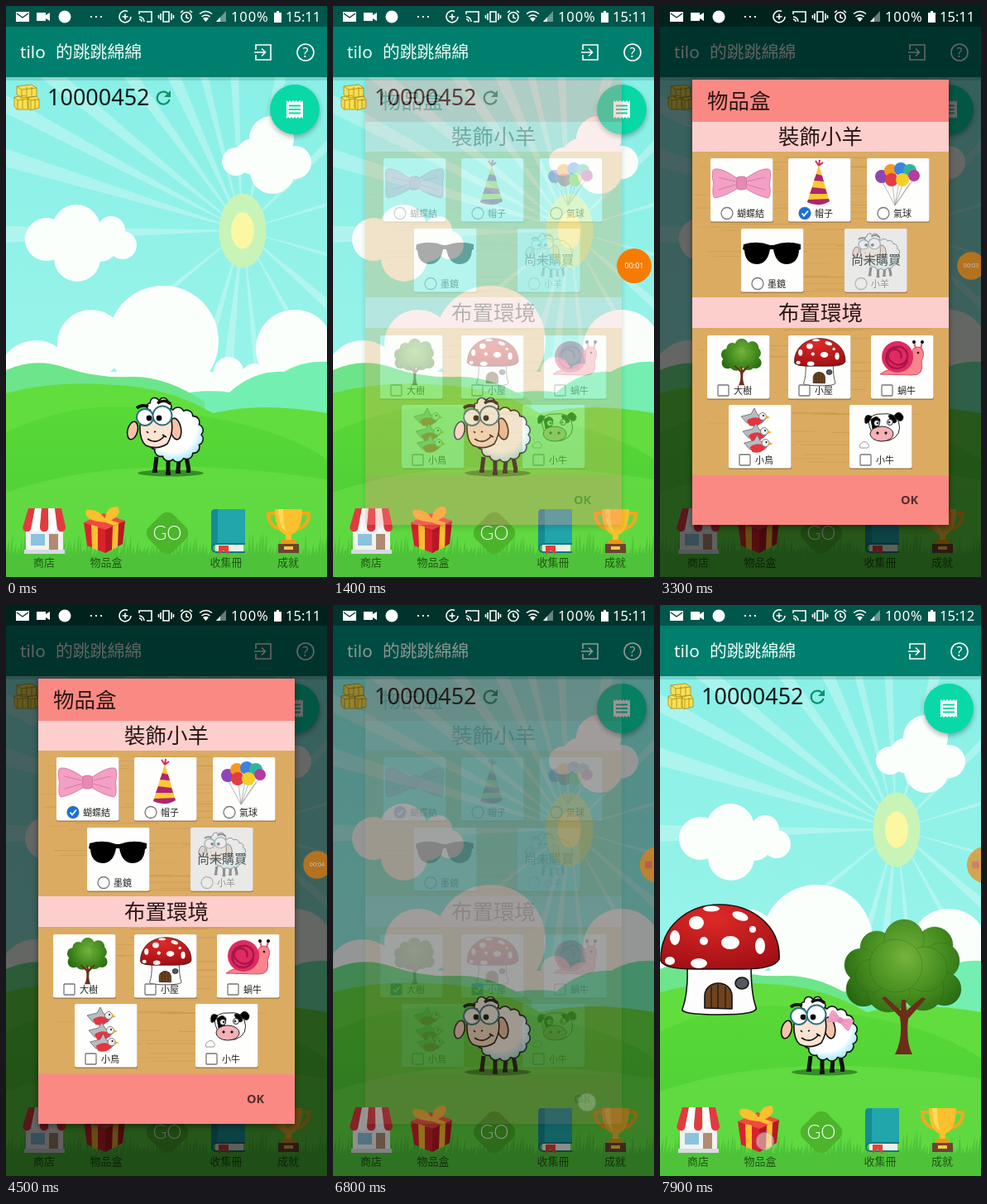
Animation, 388 px wide and 690 px high, one loop 8000 ms. Source, as an HTML page:

```html
<!DOCTYPE html>
<html lang="zh-Hant">
<head>
<meta charset="utf-8">
<title>跳跳綿綿</title>
<style>
html, body { margin: 0; height: 100%; overflow: hidden; background: #000 }
svg { display: block; width: 100vw; height: 100vh }
text { font-family: 'Noto Sans', 'Noto Sans CJK TC', 'Noto Sans CJK JP', sans-serif }
.mid { text-anchor: middle }
.ln { fill: none; stroke: #fff; stroke-width: 1.6 }
.ink { stroke: #111; stroke-width: 1.6; stroke-linejoin: round }
</style>
</head>
<body>
<svg viewBox="0 0 388 690" preserveAspectRatio="none">
<defs>
  <linearGradient id="sky" x2="0" y2="1"><stop stop-color="#86efe7"/><stop offset="1" stop-color="#a2f6ea"/></linearGradient>
  <linearGradient id="hill" x2="0" y2="1"><stop stop-color="#58d936"/><stop offset="1" stop-color="#4ccb38"/></linearGradient>
  <radialGradient id="leaf" gradientUnits="userSpaceOnUse" cx="297" cy="425" r="85"><stop stop-color="#75b33c"/><stop offset=".5" stop-color="#4a9122"/><stop offset="1" stop-color="#246610"/></radialGradient>
  <radialGradient id="red" cx=".45" cy=".2" r=".9"><stop stop-color="#dd2a28"/><stop offset="1" stop-color="#9d0d12"/></radialGradient>
  <radialGradient id="fleece" cx=".45" cy=".4" r=".6"><stop offset=".7" stop-color="#fff"/><stop offset="1" stop-color="#9deaf2"/></radialGradient>

  <g id="bow" stroke="#c9719c" stroke-width=".8">
    <path fill="#f3a0c4" d="M-4-5Q-24-19-33-17Q-37-15-34 0Q-36 17-32 18Q-20 16-4 6ZM4-5Q24-19 33-17Q37-15 34 0Q36 17 32 18Q20 16 4 6Z"/>
    <path fill="none" d="M-7-2L-28-7M-7 2L-28 8M7-2L28-7M7 2L28 8"/>
    <rect x="-6" y="-8" width="12" height="16" rx="4" fill="#e889b4"/>
  </g>

  <g id="tree">
    <g id="leaves" fill="url(#leaf)" stroke="#1d5a0c" stroke-opacity=".3"></g>
    <path fill="#6b2e1a" d="M284 543Q294 524 290 498L268 475L272 473L291 490L292 477H297L298 490L317 474L321 476L300 500Q297 528 305 543Z"/>
  </g>

  <g id="house" class="ink">
    <path fill="#fdfdfd" d="M33 436Q34 470 27 488Q24 495 72 495Q120 495 116 486Q110 470 110 434Z"/>
    <path fill="#6f4321" d="M54 487V472C55 452 86 452 87 472V488Z"/>
    <path fill="none" stroke="#3a200d" d="M62 461V487M70 457V487M79 461V487"/>
    <ellipse cx="99" cy="457" rx="8" ry="7" fill="#55585c"/>
    <path fill="url(#red)" d="M1 430C0 388 34 362 72 362C112 362 146 388 144 428Q138 440 100 440L42 440Q5 440 1 430Z"/>
    <g fill="#fff" stroke="none">
      <ellipse cx="44" cy="384" rx="9" ry="8"/><ellipse cx="62" cy="367" rx="10" ry="3.500"/><ellipse cx="18" cy="402" rx="6" ry="9"/>
      <ellipse cx="85" cy="408" rx="11" ry="8"/><ellipse cx="97" cy="376" rx="10" ry="5" transform="rotate(20 97 376)"/><ellipse cx="53" cy="406" rx="5" ry="5"/>
      <ellipse cx="47" cy="433" rx="10" ry="6"/><ellipse cx="112" cy="392" rx="4" ry="4"/><ellipse cx="121" cy="412" rx="6" ry="10"/><ellipse cx="12" cy="430" rx="6" ry="5"/>
    </g>
  </g>

  <g id="sheep" class="ink">
    <path fill="none" stroke-width="5" d="M182 545L180 561M196 548V564M209 548L208 561M218 545L221 561"/>
    <path fill="none" stroke-width="4" d="M177 562H183M193 565H199M205 563H211M218 562H223"/>
    <path id="wool" fill="url(#fleece)"/>
    <ellipse cx="153" cy="513" rx="6" ry="11" transform="rotate(14 153 513)" fill="#f4c3aa"/>
    <ellipse cx="205" cy="511" rx="6.500" ry="13" transform="rotate(-10 205 511)" fill="#f4c3aa"/>
    <path fill="#fce4d3" d="M163 494Q180 474 199 496Q204 514 195 529Q183 537 169 531Q159 523 163 494Z"/>
    <path id="fringe" fill="#fdfdfd"/>
    <circle cx="168" cy="497" r="10" fill="#fff" stroke="#2d7180" stroke-width="2"/>
    <circle cx="189" cy="495" r="11.500" fill="#fff" stroke="#2d7180" stroke-width="2"/>
    <circle cx="173" cy="498" r="2.600"/><circle cx="185" cy="498" r="2.600"/>
    <path fill="none" stroke-width="3.500" d="M158 486Q163 481 172 484M183 480Q192 474 199 481"/>
    <path fill="none" d="M171 523Q182 531 192 519M189 518L194 521M170 514L172 516M179 515L181 514"/>
  </g>

  <path id="check" fill="none" stroke="#fff" stroke-width="1.800" d="M-3.500 0L-1 3L4-3"/>
  <filter id="soft"><feGaussianBlur stdDeviation="3"/></filter>
</defs>

<rect width="388" height="690" fill="url(#sky)"/>
<g id="rays" fill="#fff" opacity=".28"></g>
<ellipse cx="286" cy="271.500" rx="28.500" ry="45" fill="#c9f4b8"/>
<ellipse cx="286" cy="271.500" rx="14" ry="22" fill="#fcf7a2"/>
<g id="clouds" fill="#fbfffc"></g>

<path fill="#74efb2" d="M200 471Q240 462 270 467Q300 440 336 442Q360 428 388 430V520H200Z"/>
<path fill="#6de58a" d="M0 440Q35 424 72 437T150 448T240 478V540H0Z"/>
<path fill="#62dd3e" d="M0 468Q60 452 130 458Q195 460 250 492Q310 478 388 492V690H0Z"/>
<path fill="url(#hill)" d="M0 515Q85 476 165 486Q320 500 388 548V690H0Z"/>
<path fill="#67df45" opacity=".7" d="M0 588Q150 535 388 572V690H0Z"/>
<path id="grass" fill="#45b936" opacity=".65"/>
<g id="decor"><use href="#house"/><use href="#tree"/></g>
<ellipse cx="199" cy="564.500" rx="40" ry="4" fill="#26751e" opacity=".75"/>
<use href="#sheep"/>
<use id="worn" href="#bow" transform="translate(218 502) rotate(25) scale(.42)"/>

<g>
  <path fill="#f2f2f2" d="M24 630H69V661H24Z"/><path fill="#8cc3df" d="M30 638H47V652H30Z"/><path fill="#b08b72" d="M52 638H63V661H52Z"/>
  <path fill="#d5dce0" d="M22 657H71V662H22Z"/>
  <g id="awning"></g>
</g>
<g>
  <path fill="#d8232c" d="M94 624L120 632V661L98 652Z"/><path fill="#b81824" d="M120 632L144 622L141 650L120 661Z"/>
  <path fill="#f04a40" d="M94 624L118 613L144 622L120 633Z"/>
  <path fill="#fac02e" d="M103 627L111 629V658L104 655ZM129 629L136 626L135 654L128 657ZM104 618L110 615L137 625L131 628ZM120 624Q92 622 97 609Q113 607 120 621Q120 605 135 605Q142 617 120 624Z"/>
</g>
<rect x="174" y="616" width="42" height="42" rx="11" transform="rotate(45 195 637)" fill="#4cb52b"/>
<text class="mid" x="195" y="645" font-size="23" font-weight="300" fill="#f3fff0" style="font-family:Lato,sans-serif">GO</text>
<g>
  <path fill="#148c96" d="M248 612Q248 608 253 608H289V650H254Q248 651 248 657Z"/><path fill="#21a6ac" d="M256 608H289V649H256Z"/>
  <path fill="#edf0e8" d="M253 651H287V659H253Z"/><path fill="none" stroke="#117983" stroke-width="2" d="M289 650H254Q249 651 249 655T254 660H289"/>
  <path fill="#e54036" d="M257 652H269V663L263 658L257 663Z"/>
</g>
<g>
  <path fill="none" stroke="#f3a91b" stroke-width="4" d="M326 613H317Q317 629 332 632M357 613H366Q366 629 351 632"/>
  <path fill="#fbc02d" d="M325 608H358Q358 634 345 639V649H338V639Q325 634 325 608Z"/><path fill="#ffda58" d="M329 608H335Q335 628 339 635Q329 630 329 608Z"/>
  <path fill="#e69b18" d="M333 645H350V651H333Z"/><path fill="#6b4332" d="M329 650H354V661H329Z"/><path fill="#f6c64a" d="M336 653H347V657H336Z"/>
</g>
<g class="mid" font-size="13" fill="#1f5313"><text x="46" y="677">商店</text><text x="121" y="677">物品盒</text><text x="266" y="677">收集冊</text><text x="341" y="677">成就</text></g>

<g fill="#f8e052" stroke="#a78a18" stroke-width=".8">
  <path d="M13 97L31 95L37 99V109L19 111L13 107ZM10 110L23 108L27 112V125L13 125L10 121ZM26 111L37 109L40 113V123L29 126L26 122Z"/>
  <path fill="none" d="M13 97L19 101L37 99M19 101V111M10 110L14 114L27 112M14 114V125M26 111L30 114L40 113M30 114V125M25 98V109M31 98V109M20 112V124M35 112V124"/>
</g>
<text x="50" y="120" font-size="27" font-weight="500" fill="#101a18">10000452</text>
<path fill="none" stroke="#11906d" stroke-width="2.200" d="M196.500 107A7.500 7.500 0 1 0 197.500 113"/><path fill="#11906d" d="M199 102V110H191Z"/>
<circle cx="349" cy="128" r="30" opacity=".3" filter="url(#soft)"/>
<circle cx="349" cy="125" r="30" fill="#08d9a7"/>
<path fill="#fff" d="M339 114L341 116L343 114L345 116L347 114L349 116L351 114L353 116L355 114L357 116L359 114V136L357 134L355 136L353 134L351 136L349 134L347 136L345 134L343 136L341 134L339 136Z"/>
<path stroke="#08d9a7" stroke-width="2" d="M342 120.500H356M342 125H356M342 129.500H356"/>

<rect y="86" width="388" height="4" opacity=".13"/>
<rect y="25" width="388" height="61" fill="#007f6e"/>
<text x="17" y="63" font-size="20.800" fill="#eefcf8"><tspan font-weight="500">tilo</tspan><tspan x="60">的跳跳綿綿</tspan></text>
<path class="ln" stroke-width="2" d="M302 53V47H320V65H302V59M300 56H313M309 51.500L313.500 56L309 60.500"/>
<circle class="ln" cx="362" cy="56" r="10"/><text class="mid" x="362" y="62" font-size="16" fill="#fff">?</text>
<rect width="388" height="25" fill="#00564a"/>
<rect id="dim" width="388" height="690"/>

<g fill="#fff">
  <path d="M12 7H28V19H12ZM37 8H48V11L53 8V18L48 15V18H37Z"/><circle cx="71" cy="13" r="7.500"/>
  <path fill="none" stroke="#00362f" stroke-width="1.400" d="M13 9L20 14L27 9"/>
  <path d="M102 12h2v2h-2zM108 12h2v2h-2zM114 12h2v2h-2z"/>
  <g class="ln"><path d="M147 6.500A7 7 0 1 0 151 13M144 9.500V16.500M140.500 13H147.500M161 10V7H176V19H170M161 13A6 6 0 0 1 167 19M161 16A3 3 0 0 1 164 19M190 7H197V19H190ZM187 9V17M200 9V17M184.500 11V15M202.500 11V15M218 10V14L221 15M211 8L214 5.500M225 8L222 5.500"/><circle cx="218" cy="13.500" r="6"/>
  <path d="M234 9.500Q241.500 3.500 249 9.500M236.500 13Q241.500 9 246.500 13"/></g>
  <path d="M238 15Q241.500 12.500 245 15L241.500 19Z"/><path opacity=".4" d="M254 19L266 6V19Z"/><path d="M254 19L259 13.500V19ZM324 8H327V6H330V8H333V20H324Z"/>
  <text x="272" y="18.500" font-size="16.500" letter-spacing=".9">100%</text><text id="clock" x="338" y="18.500" font-size="16.500"></text>
</g>

<g id="dialog">
  <rect x="38" y="90" width="312" height="541" opacity=".35" filter="url(#soft)"/>
  <rect x="39" y="89" width="310" height="538" fill="#fb8983"/>
  <rect x="39" y="140" width="310" height="427" fill="#dcab62"/>
  <g id="grain" stroke="#b47c36"></g>
  <path fill="#fccfcd" d="M39 140H349V176H39ZM39 352H349V389H39Z"/>
  <g font-size="25.500" font-weight="300" fill="#2a1615"><text x="57" y="124">物品盒</text><text class="mid" x="194" y="167">裝飾小羊</text><text class="mid" x="194" y="380">布置環境</text></g>
  <g id="cards"></g>
  <text x="291" y="602" font-size="14.500" font-weight="600" fill="#542e2c">OK</text>
</g>

<g id="rec"><circle r="21" fill="#f57c00"/><text id="count" class="mid" y="3" font-size="9" fill="#fff"></text><rect id="stop" x="-15" y="-4" width="8" height="8" rx="1.500" fill="#e8452c"/></g>
<circle id="touch" r="11" fill="#e8f0f4" stroke="#7d8fb0"/>
</svg>

<script>
const $ = id => document.getElementById(id);
let seed = 7;
const rnd = () => (seed = seed * 16807 % 2147483647) / 2147483647;
const times = (n, f) => Array.from({length: n}, (_, i) => f(i)).join('');
const disc = (x, y, r, more = '') => `<circle cx="${x}" cy="${y}" r="${r}" ${more}/>`;
const discs = list => list.map(c => disc(...c)).join('');

// Closed outline made of n round bumps along an ellipse
function scallop(x, y, rx, ry, n) {
  const at = i => {
    const a = i * 2 * Math.PI / n;
    return `${x + rx * Math.cos(a)} ${y + ry * Math.sin(a)}`;
  };
  const r = 1.15 * Math.PI * (rx + ry) / 2 / n;
  return `M${at(0)}` + times(n, i => `A${r} ${r} 0 0 1 ${at(i + 1)}`) + 'Z';
}

// Ray directions in degrees, clockwise from the right
$('rays').innerHTML = [16, 41, 61, 84, 96, 106, 141, 179, 197, 208, 219, 234, 246, 256, 267, 284, 315, 343].map(deg => {
  const a = deg * Math.PI / 180, w = .018 + rnd() * .022;
  const end = b => `${286 + 600 * Math.cos(b)} ${271 + 600 * Math.sin(b)}`;
  return `<path d="M286 271L${end(a - w)}L${end(a + w)}Z"/>`;
}).join('');
$('clouds').innerHTML = discs([
  [49, 282, 26], [85, 269, 29], [86, 305, 28], [127, 271, 17], [141, 289, 17], [114, 287, 22],
  [278, 188, 17], [299, 182, 22], [321, 160, 27], [349, 189, 20], [322, 200, 27],
  [190, 405, 67], [103, 408, 41], [36, 450, 46], [269, 442, 18], [349, 414, 47], [300, 448, 16]
]) + '<path d="M0 442H388V500H0Z"/>';
$('grass').setAttribute('d', 'M0 690V660' + times(98, i => `L${i * 4 + 2 + rnd() * 3} ${634 + rnd() * 22}L${i * 4 + 4} ${660 + rnd() * 5}`) + 'V690Z');
$('leaves').innerHTML = discs([
  [262, 414, 20], [332, 411, 22], [340, 430, 22], [243, 435, 20], [246, 464, 21], [344, 464, 20],
  [318, 465, 25], [276, 466, 26], [295, 404, 24], [256, 448, 20], [320, 440, 27], [285, 436, 32]
]);
$('wool').setAttribute('d', scallop(205, 518, 31, 30, 15));
$('fringe').setAttribute('d', scallop(185, 484, 15, 6, 8));
$('awning').innerHTML = times(5, i =>
  `<path fill="${i % 2 ? '#fff' : '#e33a42'}" d="M${27 + i * 8} 607h8L${30.6 + i * 10.4} 630a5.200 5.200 0 0 1-10.400 0Z"/>`);
$('grain').innerHTML = times(70, () => {
  const x = 39 + rnd() * 180, y = 177 + rnd() * 389;
  return `<path opacity="${.12 + rnd() * .25}" d="M${x} ${y}h${50 + rnd() * 80}"/>`;
});

const hat = `<path fill="#f8ca32" d="M37 8L23 53Q37 60 50 52Z"/>
  <path fill="#b02470" d="M34 19L41 21L43 28L31 27ZM29 35L45 37L47 43L26 43ZM24 50L49 49L50 52Q37 60 23 53Z"/>
  <path stroke="#d92a5c" stroke-width="2" d="M37 9L33 3M37 9L38 2M37 9L42 5"/>`;
const balloons = '<path fill="none" stroke="#999" stroke-width=".7" d="M18 27L34 57L31 31M45 27L34 57L40 23M56 26L34 57L52 30"/>' +
  discs([[18, 22, 8, 'fill="#8e45b8"'], [29, 15, 8, 'fill="#f59a20"'], [41, 13, 8, 'fill="#3b83e0"'], [52, 15, 8, 'fill="#30b59b"'],
    [57, 21, 7, 'fill="#b63b9d"'], [30, 26, 8, 'fill="#e43c42"'], [43, 26, 8, 'fill="#f2cf28"']]);
const shades = `<path d="M3 19Q20 14 35 20H39Q56 14 72 19V25L70 26Q69 43 54 43Q42 42 39 25H35Q32 42 20 43Q5 43 4 26L2 25Z"/>`;
const snail = `<path fill="#f9848c" stroke="#cf4c61" d="M11 47Q20 39 40 41Q53 38 50 18Q53 12 61 15Q66 22 61 31Q65 49 49 48Z"/>
  <path fill="none" stroke="#e3586c" stroke-width="2" d="M54 16L52 8M60 16L62 8"/>` +
  discs([[52, 8, 2], [62, 8, 2], [32, 26, 19, 'fill="#df2b62"'], [57, 21, 1.3]]) +
  '<path fill="none" stroke="#a9164a" stroke-width="2.500" d="M44 30A13 13 0 1 1 31 14A11 11 0 1 1 25 32A8 8 0 1 1 36 28"/>';
const bird = y => `<g transform="translate(${y / 9} ${y})"><path fill="#b7bcc2" stroke="#555" stroke-width=".7" d="M15 14L27 11L31 4L35 12L46 15L40 22L22 22Z"/>
  <path fill="#e53541" d="M22 19Q31 12 42 18Q37 28 25 25Z"/>${disc(41, 14, 4.5, 'fill="#eee" stroke="#555" stroke-width=".7"')}${disc(42, 13, 1)}<path fill="#f2a32d" d="M45 13L50 15L45 17Z"/></g>`;
const cow = `<g stroke="#222" stroke-width="1"><path fill="#fff" d="M23 20Q26 10 40 11Q54 9 59 19Q65 37 48 43Q27 45 23 20Z"/>
  <path d="M27 14Q17 9 19 22Q23 24 27 14ZM54 13Q60 5 65 14Q65 23 56 17ZM26 18Q33 11 37 18Q37 29 28 29ZM47 13Q55 10 57 20Q52 26 47 13Z"/>
  <ellipse cx="39" cy="35" rx="14" ry="9" fill="#f5b1b5"/>${discs([[33, 22, 3.5, 'fill="#fff"'], [49, 21, 3.5, 'fill="#fff"'], [34, 22, 1], [48, 21, 1], [34, 34, 1.2], [44, 34, 1.2]])}</g>
  <path fill="#fff" stroke="#999" d="M13 52a4 4 0 0 1 2-6a4 4 0 0 1 7 1a3 3 0 0 1 0 5Z"/>`;
const use = (id, move) => `<use href="#${id}" transform="${move}"/>`;

const cards = [
  [61, 184, '蝴蝶結', use('bow', 'translate(37.5 30)')], [155, 184, '帽子', hat], [250, 184, '氣球', balloons],
  [98, 269, '墨鏡', shades], [223, 269, '小羊', use('sheep', 'translate(-81 -264) scale(.62 .57)')],
  [57, 398, '大樹', use('tree', 'translate(-60 -127) scale(.345)')], [155, 398, '小屋', use('house', 'translate(7 -152) scale(.43)')],
  [255, 398, '蝸牛', snail], [83, 482, '小鳥', bird(0) + bird(18) + bird(32)], [229, 482, '小牛', cow]
];
$('cards').innerHTML = cards.map(([x, y, name, art], i) => {
  const box = fill => i < 5 ? disc(0, 0, 7, fill) : `<rect x="-6.500" y="-6.500" width="13" height="13" rx="1" ${fill}/>`;
  const locked = i == 4;
  return `<g transform="translate(${x} ${y})"><rect y="1" width="76" height="77" rx="2" opacity=".25"/><rect width="75.500" height="76.500" rx="2" fill="#fefefc"/>
    ${art}<g transform="translate(${i < 5 ? 20 : 19.500} 66.500)">${box('fill="#fff" stroke="#777" stroke-width="1.300"')}
    <g id="on${i}">${box('fill="#1670e0"')}<use href="#check"/></g></g><text x="32" y="70.500" font-size="11" fill="#222">${name}</text>` +
    (locked ? '<rect width="75.500" height="76.500" rx="2" fill="#ddd" opacity=".62"/><text class="mid" x="38" y="43" font-size="15" fill="#4a5252">尚未購買</text>' : '') + '</g>';
}).join('');

const taps = [[1120, 121, 645], [2750, 181, 251], [4050, 81, 251], [4950, 180, 464], [5700, 82, 463], [6580, 307, 601], [7820, 127, 648]];
const ramp = (t, a, b) => Math.min(1, Math.max(0, (t - a) / (b - a)));
const show = (id, on) => $(id).style.display = on ? '' : 'none';
const fade = (id, v) => $(id).setAttribute('opacity', v);

function draw(now) {
  const t = now % 8000;
  fade('dialog', ramp(t, 1335, 1540) - ramp(t, 6620, 6825));
  fade('dim', .6 * (ramp(t, 1400, 1650) - ramp(t, 6710, 7000)));
  const on = {0: t >= 4200, 1: t >= 2900 && t < 4200, 5: t >= 5880, 6: t >= 5100};
  cards.forEach((_, i) => show('on' + i, on[i]));
  show('decor', t >= 7050);
  show('worn', t >= 7050);
  $('clock').textContent = t < 7400 ? '15:11' : '15:12';

  const idle = ramp(t, 2850, 3100), tuck = ramp(t, 6400, 6650);
  show('rec', t >= 400);
  show('stop', tuck > 0);
  show('count', !tuck);
  $('count').textContent = '00:0' + Math.floor(t / 1000);
  $('rec').setAttribute('transform', `translate(${364 + 12 * idle + 17 * tuck} 314) scale(${1 - .2 * idle + .25 * tuck})`);
  fade('rec', 1 - .35 * idle);

  const tap = taps.find(p => t >= p[0] && t < p[0] + 260);
  show('touch', tap);
  if (tap) {
    $('touch').setAttribute('transform', `translate(${tap[1]} ${tap[2]})`);
    fade('touch', .5 * (1 - ramp(t, tap[0] + 140, tap[0] + 300)));
  }
}
const start = performance.now();
function tick() {
  draw(performance.now() - start);
  requestAnimationFrame(tick);
}
tick();
</script>
</body>
</html>
```
